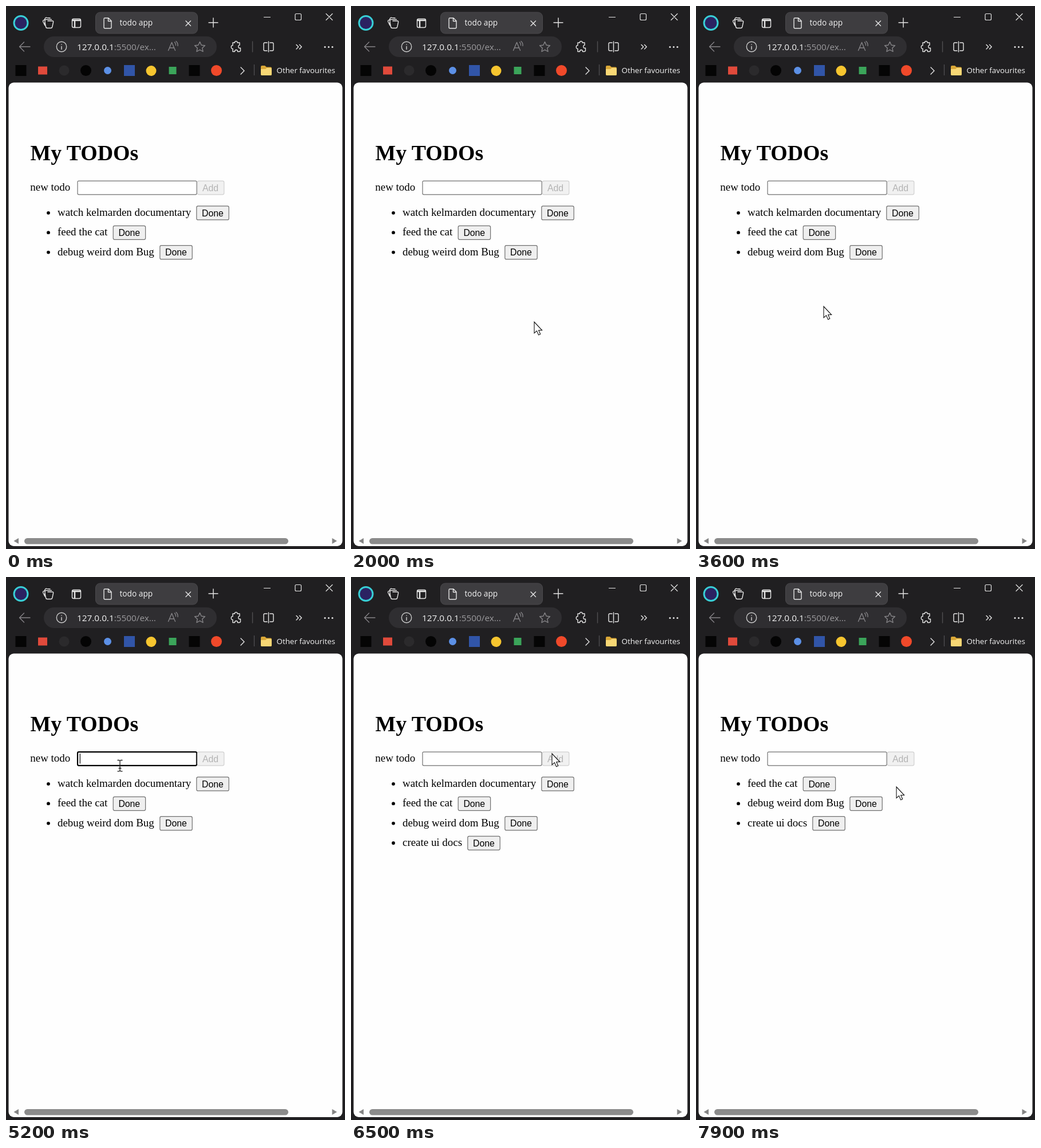
An HTML page that plays this animation: 592 px wide and 947 px high, repeating every 8 s.

```html
<!DOCTYPE html>
<html lang="en">
<head>
<meta charset="utf-8">
<title>todo app</title>
<style>
  html, body { margin: 0; width: 100%; height: 100%; overflow: hidden; background: #201f21; }
  svg { display: block; width: 592px; height: 947px; }
  .ui { font-family: "Open Sans", "Noto Sans", sans-serif; fill: #f4f4f4; }
  .serif { font: 18.93px "Liberation Serif", "Times New Roman", serif; }
  .sans { font: 15.8px "Liberation Sans", Arial, sans-serif; }
  .icon { fill: none; stroke: #e6e6e6; stroke-width: 1.4; stroke-linecap: round; stroke-linejoin: round; }
  .dim { stroke: #858487; }
  .btn rect { fill: #efefef; stroke: #6f6f6f; stroke-width: 1.2; }
  .btn.hover rect { fill: #e3e3e3; }
  .btn.off rect { fill: #f1f1f1; stroke: #d0d0d0; }
  .btn.off text { fill: #b3b3b3; }
  #field { fill: #fff; stroke: #707070; stroke-width: 1.2; }
  #field.focus { stroke: #000; stroke-width: 2.2; }
</style>
</head>
<body>
<svg viewBox="0 0 592 947">
  <rect width="592" height="947" fill="#201f21"/>

  <!-- tab strip -->
  <circle cx="26" cy="29.5" r="12" fill="#2b2262" stroke="#38cfd6" stroke-width="3"/>
  <rect x="156.5" y="11" width="178" height="37" rx="8" fill="#3e3d40" stroke="#4a494c"/>
  <g class="icon">
    <path d="M73 26H81Q83 26 82.6 28L80.8 36.5Q80.3 38.5 78.3 38.5H72Q70 38.5 69.6 36.5L68 29"/>
    <path d="M68 34L64.8 27.5Q64 25.5 66 24.7L68 24M68 31V25.500Q68 23.500 70 23.500H79.500M67.500 23L68.300 21.500Q69 20 71 20.300L77 21"/>
    <rect x="115.5" y="22.5" width="15" height="15" rx="2.5"/>
    <path d="M116 25H130M120 26V37" stroke-width="2.4"/>
    <path d="M172 21H179L184 26V37Q184 39 182 39H173Q171 39 171 37V23Q171 21 172 21ZM178.5 21V26.5H184"/>
    <path d="M314 26L322.5 34.5M322.5 26L314 34.5"/>
    <path d="M354 29H370M362 21V37"/>
    <path d="M450.5 19.5H461.5M559 13.5L570 24.5M570 13.5L559 24.5" stroke-width="1.2"/>
    <rect x="505" y="13.5" width="10.5" height="11" rx="2" stroke-width="1.2"/>
  </g>
  <text class="ui" x="198.5" y="34.1" font-size="13.7">todo app</text>

  <!-- toolbar -->
  <rect x="66" y="53" width="302" height="36" rx="18" fill="#2f2e31"/>
  <g class="icon">
    <path class="dim" d="M42 71H23.5M31.5 63L23.5 71L31.5 79"/>
    <circle cx="97" cy="71" r="8.7" stroke="#c9c9c9"/>
    <path d="M97 70.5V75.5M97 67V67.2" stroke="#d5d5d5"/>
    <path class="dim" d="M283.5 77.5L289.5 63.5L295.5 77.5M285.5 73H293.5M294.5 63Q297 65.5 296.5 68.5M297 61.5Q300.5 64.5 300 69.5"/>
    <path class="dim" d="M338.5 62.5L341.2 68.3L347.5 69L342.8 73.3L344 79.5L338.5 76.4L333 79.5L334.2 73.3L329.5 69L335.8 68.3Z"/>
    <path d="M396 64H399.5Q399 61.5 401.7 61.5Q404.5 61.5 404 64H408V68.3Q405.8 68 405.8 71Q405.8 74 409.5 73.3V78Q409 79.5 407.5 79.5H404.5Q404.5 76.5 402 76.5Q399.5 76.5 399.5 79.5H396V74.5Q393.3 74.8 393.3 71.5Q393.3 68.5 396 68.7Z"/>
    <path d="M456 64H452Q450 64 450 66V76Q450 78 452 78H456M461 64H465Q467 64 467 66V76Q467 78 465 78H461M458.5 62V80"/>
    <path d="M507 67.5L510.7 71.3L507 75M512.5 67.5L516.2 71.3L512.5 75"/>
    <path d="M430.5 62V80" stroke="#504f52"/>
  </g>
  <g fill="#e6e6e6"><circle cx="557" cy="71.5" r="1.5"/><circle cx="563.5" cy="71.5" r="1.5"/><circle cx="570" cy="71.5" r="1.5"/></g>
  <text class="ui" x="124" y="76.5" font-size="15.3">127.0.0.1<tspan fill="#9b9a9d">:5500/ex...</tspan></text>

  <!-- bookmarks -->
  <rect x="16.5" y="103" width="19" height="19" fill="#050505"/>
  <rect x="56" y="105.5" width="16" height="14" fill="#e04a3b"/>
  <circle cx="101.5" cy="112.5" r="9" fill="#2b2a2c"/>
  <circle cx="139.5" cy="112.5" r="9.5" fill="#040404"/>
  <circle cx="177.5" cy="112.5" r="6.5" fill="#5c90e6"/>
  <rect x="206" y="103" width="19" height="19" fill="#3155a8"/>
  <circle cx="253.5" cy="113" r="9" fill="#f6c52f"/>
  <rect x="284.5" y="106" width="13" height="13" fill="#3ba55a"/>
  <rect x="319.5" y="103" width="19" height="19" fill="#050505"/>
  <circle cx="367.5" cy="112.5" r="9.5" fill="#f0492a"/>
  <path class="icon" d="M410 107L416 113L410 119"/>
  <path d="M433.5 102V121" stroke="#504f52" stroke-width="1.3"/>
  <path d="M445 106Q445 104 447 104H452L455 106.5H462Q464 106.5 464 108.5V119Q464 121 462 121H447Q445 121 445 119Z" fill="#d9a737"/>
  <path d="M445 110H453L455.5 108H462Q464 108 464 110V119Q464 121 462 121H447Q445 121 445 119Z" fill="#f8d775"/>
  <text class="ui" x="472.5" y="116.9" font-size="13.4">Other favourites</text>

  <!-- page -->
  <rect x="4.5" y="133.5" width="583" height="808.5" rx="9" fill="#fefefe"/>
  <rect x="32" y="928" width="461" height="10.5" rx="5.25" fill="#8b8b8b"/>
  <path d="M13.5 933L22 928V938ZM578 933L569.5 928V938Z" fill="#858585"/>
  <text class="serif" x="42.5" y="269.2" style="font-size:37.8px;font-weight:bold">My TODOs</text>
  <text class="serif" x="42.3" y="322.4">new todo</text>
  <rect id="field" x="125" y="305.2" width="208" height="23.6" rx="2"/>
  <text id="typed" class="sans" x="128.8" y="322.5"></text>
  <path id="caret" d="M0 308V325.5" stroke="#000" stroke-width="1.2"/>
  <g id="add" class="btn">
    <rect x="334.2" y="305.2" width="46.6" height="23.6" rx="2.5"/>
    <text class="sans" x="343" y="322.5">Add</text>
  </g>
  <g id="list"></g>

  <g id="pointer">
    <path id="arrow" d="M0 0V19.5L4.5 15.6L7.6 22.7L10.7 21.3L7.7 14.5H13.6Z" fill="#fff" stroke="#111" stroke-width="1.1"/>
    <path id="beam" d="M-4.5 -9.5H-1.5L0 -8.5L1.5 -9.5H4.5M0 -8.5V8.8M-4.5 9.8H-1.5L0 8.8L1.5 9.8H4.5M-2.5 4.5H2.5" fill="none" stroke="#222" stroke-width="1.3"/>
  </g>
</svg>
<script>
  const LOOP = 8000, TICK = 100, PITCH = 34.4;
  const ENTER = 300, FOCUS = 4900, TYPE = 5200, TYPED = 5700, PRESS = 6000, ADDED = 6300, DONE = 7600;
  const DRAFT = 'create ui docs';
  const ITEMS = [
    ['watch kelmarden documentary', 332.8],
    ['feed the cat', 187.2],
    ['debug weird dom Bug', 268.8],
    [DRAFT, 203.8]
  ];
  // time, x, y
  const PATH = [
    [300, 386, 520], [700, 335, 546], [900, 335, 546], [1500, 320, 551], [2300, 320, 551],
    [2600, 314, 551], [3100, 272, 633], [3600, 223, 524], [3900, 219, 500], [4400, 205, 418],
    [4700, 199, 329], [5700, 199, 329], [6000, 337, 309], [6300, 351, 308], [6800, 351, 308],
    [7100, 351, 322], [7400, 350, 366], [8000, 350, 366]
  ];
  const $ = id => document.getElementById(id);
  const show = (el, on) => el.setAttribute('visibility', on ? 'visible' : 'hidden');
  const move = (el, x, y) => el.setAttribute('transform', `translate(${x} ${y})`);

  $('list').innerHTML = ITEMS.map(([label, x]) => `<g>
    <circle cx="74" cy="360.8" r="2.9"/>
    <text class="serif" x="90" y="366">${label}</text>
    <g class="btn"><rect x="${x}" y="348.9" width="56.4" height="24" rx="2.5"/>
    <text class="sans" x="${x + 9.2}" y="366.5">Done</text></g></g>`).join('');
  const rows = [...$('list').children];

  function pointerAt(t) {
    const i = Math.max(1, PATH.findIndex(p => p[0] > t));
    const [t0, x0, y0] = PATH[i - 1], [t1, x1, y1] = PATH[i];
    const u = Math.min(1, Math.max(0, (t - t0) / (t1 - t0)));
    const e = u * u * (3 - 2 * u);
    return [x0 + (x1 - x0) * e, y0 + (y1 - y0) * e];
  }

  function draw(t) {
    const [x, y] = pointerAt(t);
    const focused = t >= FOCUS && t < PRESS;
    const typing = t >= TYPE && t < ADDED;
    const count = typing ? Math.min(DRAFT.length, Math.round((t - TYPE) / (TYPED - TYPE) * DRAFT.length)) : 0;
    const over = (l, top, r, b) => x >= l && x <= r && y >= top && y <= b;

    $('field').setAttribute('class', focused ? 'focus' : '');
    $('typed').textContent = DRAFT.slice(0, count);
    const width = count ? $('typed').getComputedTextLength() : 0;
    move($('caret'), 129.3 + width, 0);
    show($('caret'), focused);
    $('add').setAttribute('class', 'btn' + (!count ? ' off' : over(334, 305, 381, 329) ? ' hover' : ''));

    let line = 0;
    rows.forEach((row, i) => {
      const on = i === 0 ? t < DONE : i < 3 || t >= ADDED;
      const top = 348.5 + line * PITCH, left = ITEMS[i][1];
      show(row, on);
      move(row, 0, line * PITCH);
      row.lastElementChild.setAttribute('class', 'btn' + (on && over(left, top, left + 57, top + 25) ? ' hover' : ''));
      if (on) line++;
    });

    const beam = over(125, 304, 333, 330);
    const seen = t >= ENTER;
    show($('arrow'), seen && !beam);
    show($('beam'), seen && beam);
    move($('pointer'), x, y);
  }

  function frame(now) {
    draw(Math.floor(now % LOOP / TICK) * TICK);
    requestAnimationFrame(frame);
  }
  draw(0);
  requestAnimationFrame(frame);
</script>
</body>
</html>
```
